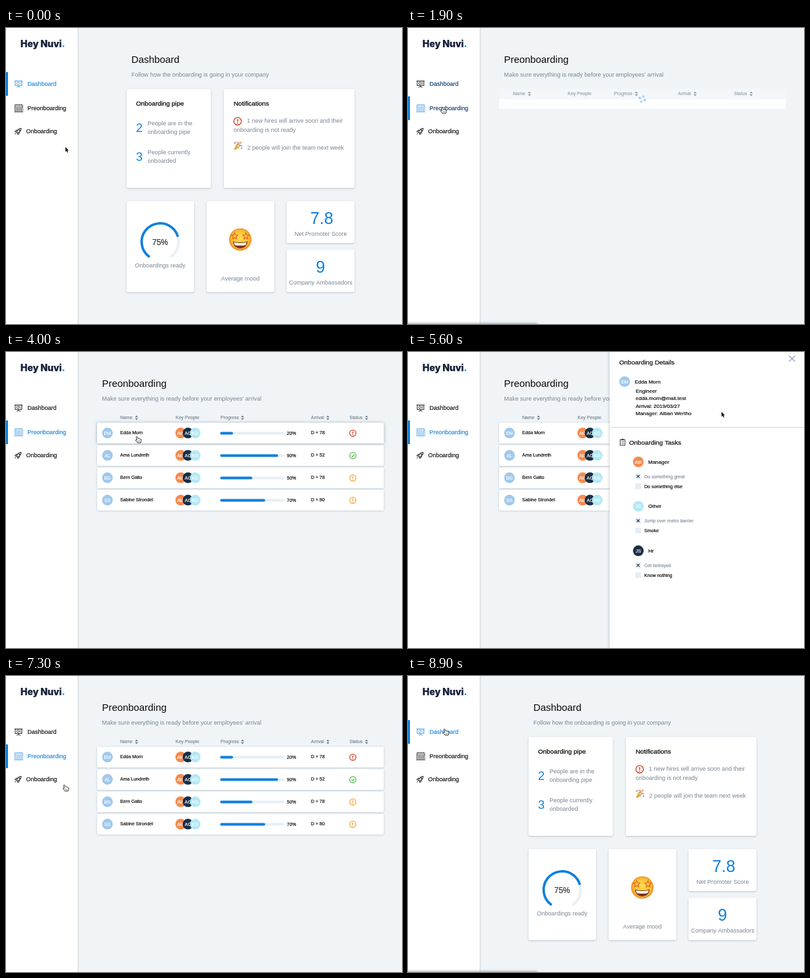
Recreate the animation shown at these times as an HTML page with a canvas. Size 600 by 450 pixels, loop 9000 ms.

```html
<!DOCTYPE html>
<html lang="en">
<head>
<meta charset="utf-8">
<title>Onboarding dashboard</title>
<style>
html, body { margin: 0; width: 100%; height: 100%; overflow: hidden; background: #f0f4f7; }
canvas { display: block; }
</style>
</head>
<body>
<canvas id="stage" width="600" height="450"></canvas>
<script>
const c = document.getElementById('stage').getContext('2d');
const LOOP = 9000, TAU = Math.PI * 2;
const SANS = '"Liberation Sans", Arial, sans-serif';
const BLUE = '#0f80dc', MUTED = '#7a8593', HEAD = '#6d7a8a', BG = '#f0f4f7', INK = '#0a0a0a';
const RED = '#d03a1c', GREEN = '#4cb84c', AMBER = '#f0a02c';
const ORANGE = '#f58a4d', NAVY = '#1a2f45', CYAN = '#b4e8f5', SKY = '#a0c9ec';

// Moments of the story
const TO_TABLE = 1800, TABLE_READY = 2200, OPEN = 4150, CLOSE = 6500, TO_DASH = 8500, DASH_READY = 8700;

// time, x, y of the pointer tip
const path = [
  [0, 90, 181], [100, 90, 181], [600, 52, 121], [2450, 52, 121], [3400, 199, 129],
  [4500, 199, 129], [5400, 475, 91], [5600, 475, 91], [6350, 581, 10],
  [6550, 581, 10], [7300, 89, 166], [7450, 88, 164], [7900, 56, 81], [9000, 56, 81]
];

const people = [
  ['EM', 'Edda Morn', 20, 'D + 78', RED],
  ['AL', 'Ama Lundreth', 90, 'D + 52', GREEN],
  ['BG', 'Bern Galto', 50, 'D + 78', AMBER],
  ['SS', 'Sabine Strondel', 70, 'D + 80', AMBER]
];
const groups = [
  ['AW', ORANGE, 'Manager', 'Do something great', 'Do something else'],
  ['JC', CYAN, 'Other', 'Jump over metro barrier', 'Smoke'],
  ['JS', NAVY, 'Hr', 'Get betrayed', 'Know nothing']
];

const clamp = v => Math.max(0, Math.min(1, v));
const ease = v => { v = clamp(v); return v < .5 ? 4 * v ** 3 : 1 - 4 * (1 - v) ** 3; };
const soft = v => { v = clamp(v); return v * v * (3 - 2 * v); };

function text(s, x, y, size, color, { align = 'left', medium = 0, font = SANS, weight = '' } = {}) {
  c.font = `${weight} ${size}px ${font}`;
  c.textAlign = align;
  c.fillStyle = color;
  c.fillText(s, x, y);
  if (medium) {
    c.strokeStyle = color;
    c.lineWidth = medium;
    c.strokeText(s, x, y);
  }
}

const label = (s, x, y, size) => text(s, x, y, size, INK, { medium: .18 });

function disc(x, y, r, color) {
  c.fillStyle = color;
  c.beginPath();
  c.arc(x, y, r, 0, TAU);
  c.fill();
}

function line(color, width, ...pts) {
  c.strokeStyle = color;
  c.lineWidth = width;
  c.beginPath();
  pts.forEach(([x, y], i) => i ? c.lineTo(x, y) : c.moveTo(x, y));
  c.stroke();
}

function poly(color, pts) {
  c.fillStyle = color;
  c.beginPath();
  pts.forEach(([x, y]) => c.lineTo(x, y));
  c.closePath();
  c.fill();
}

function box(x, y, w, h, r, color) {
  c.fillStyle = color;
  c.beginPath();
  c.roundRect(x, y, w, h, r);
  c.fill();
}

function shadowed(alpha, blur, dx, dy, draw) {
  c.save();
  c.shadowColor = `rgba(40,70,90,${alpha})`;
  c.shadowBlur = blur;
  c.shadowOffsetX = dx;
  c.shadowOffsetY = dy;
  draw();
  c.restore();
}

const card = (x, y, w, h) => shadowed(.28, 3, 0, 1, () => box(x, y, w, h, 2.5, '#fff'));

function avatar(s, x, y, color) {
  disc(x, y, 8.1, color);
  text(s, x, y + 2.5, 7, '#fff', { align: 'center', medium: .15 });
}

function badge(x, y, r, color, width) {
  c.strokeStyle = color;
  c.lineWidth = width;
  c.beginPath();
  c.arc(x, y, r, 0, TAU);
  c.stroke();
  if (color === GREEN) {
    line(color, width, [x - 2.2, y], [x - .5, y + 1.8], [x + 2.4, y - 1.6]);
  } else {
    line(color, width * 1.1, [x, y - r * .58], [x, y + r * .18]);
    disc(x, y + r * .5, width * .6, color);
  }
}

function spinner(x, y, r, dot, elapsed) {
  for (let i = 0; i < 4; i++) {
    const a = elapsed / 1200 * TAU + (5 + i * 90) * Math.PI / 180;
    disc(x + r * Math.sin(a), y - r * Math.cos(a), dot, i % 2 ? '#a4cdf2' : '#b0d3f2');
  }
}

function heading(x, title, sub) {
  text(title, x, 53, 14.9, INK);
  text(sub, x, 73.5, 8.95, MUTED);
}

function boardIcon(col) {
  line(col, 1.1, [12.8, 80.6], [25.2, 80.6]);
  c.strokeRect(14, 80.6, 10, 6.8);
  line(col, .9, [19, 87.4], [19, 90.6]);
  line(col, .9, [16, 90.7], [19, 88.2], [22, 90.7]);
  c.beginPath();
  c.arc(18, 84, 1.7, 0, TAU);
  c.stroke();
  line(col, .9, [20.6, 83], [22.6, 83]);
  line(col, .9, [20.6, 85], [22.6, 85]);
}

function calendarIcon(col) {
  c.strokeStyle = col;
  c.lineWidth = .9;
  c.strokeRect(13.4, 117, 11.8, 10.8);
  line(col, .9, [13.4, 119.8], [25.2, 119.8]);
  for (let i = 0; i < 4; i++) line(col, .9, [15.3 + i * 2.7, 115.5], [15.3 + i * 2.7, 118.4]);
  c.fillStyle = col;
  for (let i = 0; i < 12; i++) c.fillRect(14.7 + i % 4 * 2.5, 121 + (i / 4 | 0) * 2.2, 1.7, 1.5);
}

function rocketIcon(col) {
  c.strokeStyle = col;
  c.lineWidth = 1.1;
  c.beginPath();
  c.moveTo(23, 152.5);
  c.quadraticCurveTo(18.5, 152.5, 16, 158);
  c.lineTo(17.8, 159.8);
  c.quadraticCurveTo(23, 157, 23, 152.5);
  c.stroke();
  line(col, 1, [17.5, 155.3], [14.8, 155.6], [13.3, 158], [16, 158]);
  line(col, 1, [20.3, 158.2], [20, 160.6], [17.8, 162], [17.8, 159.8]);
  line(col, 1, [15.4, 159.6], [13.4, 161.8]);
  disc(20.2, 155.4, 1.1, col);
}

function sidebar(t) {
  shadowed(.38, 3, .5, 0, () => { c.fillStyle = '#fff'; c.fillRect(-5, -5, 113.7, 460); });
  const logo = { font: 'Inter, sans-serif', weight: 800, medium: .25 };
  text('Hey Nuvi', 22, 29, 14, '#141f38', logo);
  text('.', 22 + c.measureText('Hey Nuvi').width, 29, 14, '#1f93e6', logo);

  const onTable = t >= TO_TABLE && t < TO_DASH;
  const table = soft((t - TO_TABLE) / 200) - soft((t - TO_DASH - 30) / 250);
  const tint = p => `rgb(${15 * p ** 1.8},${128 * p ** 1.4},${220 * p})`;
  c.fillStyle = BLUE;
  c.fillRect(0, onTable ? 104 : 67, 3, 36);
  boardIcon(onTable ? '#3a3a3a' : '#5ba6e2');
  calendarIcon(onTable ? '#6fb0e6' : '#444');
  rocketIcon('#222');
  text('Dashboard', 32.5, 88, 9, tint(1 - table), { medium: .12 });
  text('Preonboarding', 32.5, 124.8, 8.95, tint(table), { medium: .12 });
  text('Onboarding', 30.5, 160.3, 8.95, '#000', { medium: .12 });
}

function starEye(x, y) {
  const pts = [];
  for (let i = 0; i < 10; i++) {
    const r = i % 2 ? 2.9 : 6.4, a = i * TAU / 10;
    pts.push([x + r * Math.sin(a), y - r * Math.cos(a)]);
  }
  poly('#e5571f', pts);
  poly('#f7c948', pts.map(([a, b]) => [x + (a - x) * .6, y + (b - y) * .6]));
}

function moodFace(x, y) {
  const g = c.createRadialGradient(x, y - 3, 4, x, y, 17.5);
  g.addColorStop(0, '#ffd84a');
  g.addColorStop(.7, '#f9b82f');
  g.addColorStop(1, '#e5852a');
  disc(x, y, 17, g);
  c.beginPath();
  c.moveTo(x - 11, y + 3);
  c.quadraticCurveTo(x, y + 6, x + 11, y + 3);
  c.bezierCurveTo(x + 10, y + 17, x - 10, y + 17, x - 11, y + 3);
  c.fillStyle = '#7a3218';
  c.fill();
  c.beginPath();
  c.moveTo(x - 9.5, y + 4.2);
  c.quadraticCurveTo(x, y + 6.6, x + 9.5, y + 4.2);
  c.quadraticCurveTo(x + 9, y + 8, x + 7.5, y + 8.7);
  c.quadraticCurveTo(x, y + 10, x - 7.5, y + 8.7);
  c.quadraticCurveTo(x - 9, y + 8, x - 9.5, y + 4.2);
  c.fillStyle = '#fff';
  c.fill();
  starEye(x - 8.5, y - 5);
  starEye(x + 8.5, y - 5);
}

function popper(x, y) {
  poly('#eab13c', [[x, y + 13], [x + 4, y + 3.5], [x + 9, y + 9]]);
  line('#b9782a', .9, [x + 2, y + 9], [x + 4.5, y + 11]);
  line('#c44f3a', 1.2, [x + 5.5, y + 5], [x + 7, y + 2.5], [x + 6, y]);
  line('#3f8fd0', 1.2, [x + 8, y + 7], [x + 10, y + 5.5], [x + 13, y + 6]);
  line('#d8a032', 1.2, [x + 7, y + 5.5], [x + 10, y + 2], [x + 12.5, y + 1]);
  disc(x + 1.5, y + 2, 1, '#d14d62');
  disc(x + 3.5, y + .6, .8, '#55a34e');
  disc(x + 12, y + 9.5, 1, '#7b57b0');
  disc(x + 9.5, y + .5, .8, '#cf5540');
}

function gauge(x, y) {
  const start = 127.5, sweep = 285;
  const arc = (part, color) => {
    c.strokeStyle = color;
    c.lineWidth = 3.7;
    c.lineCap = 'round';
    c.beginPath();
    c.arc(x, y, 28, start * TAU / 360, (start + sweep * part) * TAU / 360);
    c.stroke();
    c.lineCap = 'butt';
  };
  arc(1, '#e9f0f5');
  arc(.75, BLUE);
  text('75%', x, y + 4.6, 12, '#333', { align: 'center', medium: .2 });
}

function dashboard(t) {
  heading(190, 'Dashboard', 'Follow how the onboarding is going in your company');
  if (t >= TO_DASH && t < DASH_READY) return spinner(355, 256, 6.2, 2.8, t - TO_DASH);
  const mid = { align: 'center' };
  card(182.5, 92.5, 128, 150.5);
  card(330, 92.5, 198, 150.5);
  card(182.5, 263, 102.5, 138.5);
  card(304, 263, 102.5, 138.5);
  card(425, 263, 103, 64);
  card(425, 337, 103, 64.5);

  text('Onboarding pipe', 197, 118, 9.8, INK, { medium: .25 });
  text('2', 197, 158, 18, BLUE);
  text('People are in the', 214.5, 148, 9, MUTED);
  text('onboarding pipe', 214.5, 161, 9, MUTED);
  text('3', 197, 202, 18, BLUE);
  text('People currently', 214.5, 192, 9, MUTED);
  text('onboarded', 214.5, 205, 9, MUTED);

  text('Notifications', 345, 118, 9.8, INK, { medium: .25 });
  badge(351, 141.8, 5.7, RED, 1.3);
  text('1 new hires will arrive soon and their', 365, 144.3, 9, MUTED);
  text('onboarding is not ready', 345, 157.7, 9, MUTED);
  popper(345, 173);
  text('2 people will join the team next week', 365.5, 185, 9, MUTED);

  gauge(233.5, 325);
  text('Onboardings ready', 233.5, 364.3, 9, MUTED, mid);
  moodFace(355, 321.5);
  text('Average mood', 355, 383.7, 9, MUTED, mid);
  text('7.8', 478.5, 297.5, 25, BLUE, mid);
  text('Net Promoter Score', 476.8, 316, 9, MUTED, mid);
  text('9', 476.5, 371.5, 25, BLUE, mid);
  text('Company Ambassadors', 476.8, 390, 9, MUTED, mid);
}

function sorter(x, color) {
  poly(color, [[x - 2.3, 99.2], [x, 96.6], [x + 2.3, 99.2]]);
  poly(color, [[x - 2.3, 100.8], [x, 103.4], [x + 2.3, 100.8]]);
}

function header(xs, sorts, color) {
  ['Name', 'Key People', 'Progress', 'Arrival', 'Status'].forEach((s, i) => text(s, xs[i], 102.3, 7, color, { medium: .1 }));
  sorts.forEach(x => sorter(x, color));
}

function row([initials, name, pct, arrival, status], y, hover) {
  shadowed(hover ? .45 : .32, hover ? 5 : 3, 0, .4, () => box(138, y, 434.5, 31.3, 2, '#fff'));
  const m = y + 15.6;
  avatar(initials, 153.7, m, SKY);
  label(name, 173, m + 2.2, 7);
  avatar('AW', 264.7, m, ORANGE);
  avatar('AC', 275.7, m, NAVY);
  avatar('KG', 286.7, m, CYAN);
  box(324.5, m - 1.8, 97.5, 4, 2, '#e6eff6');
  box(324.5, m - 1.8, 97.5 * pct / 100, 4, 2, BLUE);
  label(pct + '%', 425.5, m + 2.8, 7);
  label(arrival, 462, m + 2.2, 7);
  badge(525.5, m + .4, 4.7, status, 1.2);
}

function table(t, p, panelX) {
  heading(145.5, 'Preonboarding', 'Make sure everything is ready before your employees\u2019 arrival');
  if (t < TABLE_READY) {
    c.fillStyle = '#f4f7f9';
    c.fillRect(138, 92, 434.5, 16);
    c.fillStyle = '#fdfefe';
    c.fillRect(138, 108, 434.5, 15);
    header([159, 242, 312, 409, 494], [184, 346, 435, 520], '#8d99a6');
    return spinner(355, 108, 4.2, 1.9, t - TO_TABLE - 40);
  }
  header([173, 257, 325, 462, 520.5], [197.7, 358.3, 487.7, 546.3], HEAD);
  people.forEach((who, i) => row(who, 107.6 + i * 34, rowAt(p, panelX) === i));
}

function rowAt(p, panelX) {
  const i = Math.floor((p.y - 107.6) / 34);
  return p.x > 138 && p.x < Math.min(572, panelX) && i >= 0 && i < 4 ? i : -1;
}

function checkbox(y, on) {
  box(344.2, y - 4.5, 9, 9, 1, '#e6eef5');
  if (!on) return;
  line('#22354a', 1.1, [346.6, y - 2.1], [350.8, y + 2.1]);
  line('#22354a', 1.1, [350.8, y - 2.1], [346.6, y + 2.1]);
}

function clipboard(x, y) {
  c.strokeStyle = '#333';
  c.lineWidth = .9;
  c.strokeRect(x - 3.6, y - 3.8, 7.4, 8.8);
  box(x - 1.6, y - 5, 3.4, 2, .6, '#333');
  for (let i = 0; i < 3; i++) {
    c.fillRect(x - 2.2, y - 1.6 + i * 2.1, .9, .8);
    c.fillRect(x - .5, y - 1.6 + i * 2.1, 2.7, .7);
  }
}

function panel(x) {
  c.save();
  c.translate(x - 305, 0);
  shadowed(.3, 4, -1, 0, () => { c.fillStyle = '#fff'; c.fillRect(305.5, -5, 300, 460); });
  text('Onboarding Details', 320, 18.6, 9.8, INK, { medium: .2 });
  line('#7d92a8', 1.1, [577.3, 5.6], [586.3, 14.6]);
  line('#7d92a8', 1.1, [586.3, 5.6], [577.3, 14.6]);
  avatar('EM', 328.2, 45, SKY);
  label('Edda Morn', 343.5, 47.7, 8);
  ['Engineer', 'edda.morn@mail.test', 'Arrival: 2019/03/27', 'Manager: Alban Wertho']
    .forEach((s, i) => label(s, 345, 61.7 + i * 11.5, 8));
  line('#cbd6e0', 1, [305.5, 114.5], [600, 114.5]);
  clipboard(325, 137);
  text('Onboarding Tasks', 335, 140.6, 9.8, INK, { medium: .2 });
  groups.forEach(([who, color, role, done, todo], i) => {
    const y = 167 + i * 67.6;
    avatar(who, 349, y, color);
    label(role, 364, y + 2.8, 8);
    checkbox(y + 22, true);
    text(done, 358, y + 24.5, 7, MUTED, { medium: .12 });
    checkbox(y + 37, false);
    label(todo, 358, y + 39.5, 7);
  });
  c.restore();
}

function pointerAt(t) {
  const i = Math.max(1, path.findIndex(k => k[0] > t));
  const [t0, x0, y0] = path[i - 1], [t1, x1, y1] = path[i];
  const k = soft((t - t0) / (t1 - t0));
  return { x: x0 + (x1 - x0) * k, y: y0 + (y1 - y0) * k };
}

function pointer({ x, y }, hand) {
  c.save();
  c.translate(x, y);
  c.lineJoin = 'round';
  c.beginPath();
  if (hand) {
    c.moveTo(-1.8, .2);
    c.quadraticCurveTo(-.6, -1, .4, .4);
    c.lineTo(1.2, 2.8);
    c.quadraticCurveTo(2.6, 2, 3, 3);
    c.quadraticCurveTo(4.4, 2.4, 4.6, 3.5);
    c.quadraticCurveTo(6, 3.2, 6, 4.8);
    c.quadraticCurveTo(6.2, 6.6, 5, 9);
    c.lineTo(.2, 9);
    c.quadraticCurveTo(-.8, 7.2, -2.8, 5.2);
    c.quadraticCurveTo(-2.6, 3.8, -.6, 4.8);
    c.closePath();
    c.fillStyle = '#fff';
    c.fill();
    c.strokeStyle = '#222';
    c.lineWidth = .9;
    c.stroke();
    for (let i = 0; i < 3; i++) line('#333', .5, [1 + i * 1.3, 5.6], [1.1 + i * 1.3, 7.6]);
  } else {
    [[0, 0], [0, 7.2], [1.7, 5.7], [2.9, 8.5], [4.2, 8], [3, 5.2], [5.2, 5.2]].forEach(q => c.lineTo(...q));
    c.closePath();
    c.strokeStyle = '#fff';
    c.lineWidth = 1.2;
    c.stroke();
    c.fillStyle = '#111';
    c.fill();
  }
  c.restore();
}

function draw(t) {
  const p = pointerAt(t);
  const shown = ease((t - OPEN) / 300) - ease((t - CLOSE) / 300);
  const panelX = 600 - 295 * shown;
  c.fillStyle = BG;
  c.fillRect(0, 0, 600, 450);
  sidebar(t);
  if (t >= TO_TABLE && t < TO_DASH) table(t, p, panelX);
  else dashboard(t);
  if (shown > 0) panel(panelX);

  // Shadow of the link bubble just below the lower edge
  if ((t >= 1000 && t < 2900) || t >= 8200) {
    shadowed(.75, 4, 0, 0, () => { c.fillStyle = '#ccc'; c.fillRect(-5, 450, 201, 6); });
  }

  const inMenu = p.x < 108 && p.y > 67 && p.y < 176;
  const onClose = shown > 0 && p.x > 575 && p.y < 18;
  const onRow = t >= TABLE_READY && t < TO_DASH && rowAt(p, panelX) >= 0;
  pointer(p, inMenu || onClose || onRow);
}

const begin = performance.now();
function tick() {
  draw((performance.now() - begin) % LOOP);
  requestAnimationFrame(tick);
}
tick();
</script>
</body>
</html>
```
